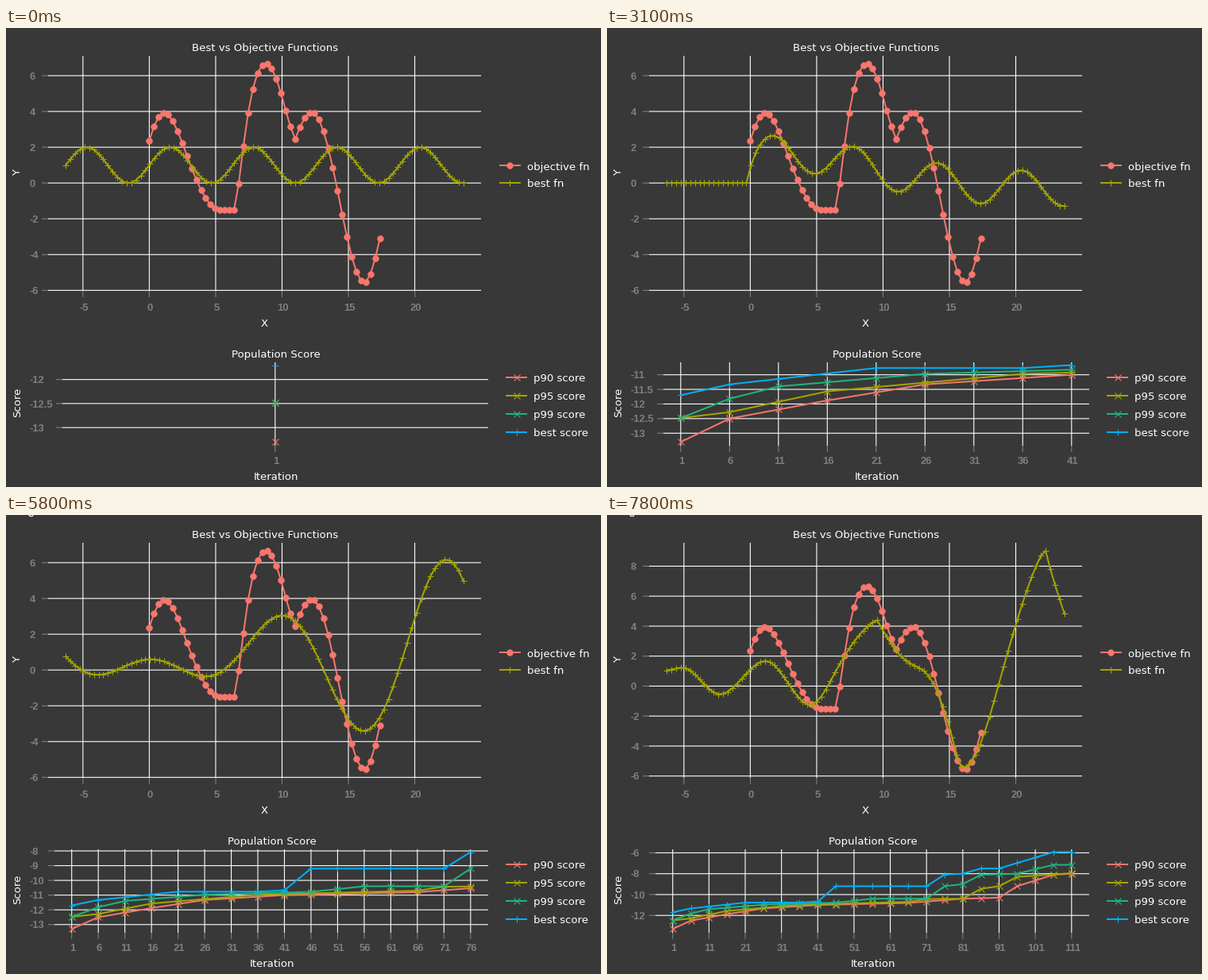
A matplotlib script for the animation above (8000 ms loop, 749 by 578 pixels).

```python
import numpy as np
import matplotlib.pyplot as plt
from matplotlib.animation import FuncAnimation

W, H, DPI = 749, 578, 100
STEP_MS, LOOP_MS = 100, 8000
PX = 72 / DPI
BG, GREY = "#383838", "#7f7f7f"
RED, OLIVE, GREEN, BLUE = "#f8766d", "#a3a500", "#1fb57e", "#00b0f6"


def spline(*knots):
    """Cubic through (x, y, slope) knots; a repeated x makes a corner."""
    kx, ky, slope = np.array(knots).T

    def curve(x):
        k = np.clip(np.searchsorted(kx, x, "right") - 1, 0, len(kx) - 2)
        h = kx[k + 1] - kx[k]
        u = (x - kx[k]) / h
        rise = ky[k + 1] - ky[k]
        return (ky[k] + rise * u * u * (3 - 2 * u)
                + h * u * (1 - u) * (slope[k] * (1 - u) - slope[k + 1] * u))
    return curve


def wave(offset):
    return lambda x: np.sin(x) + offset


def root_wave(offset):
    return lambda x: np.where(
        x < 0, 0, np.sin(x) + np.sin(np.sqrt(np.maximum(x, 0))) + offset)


def swell(gain, offset):
    return lambda x: offset - gain * x * np.sin((x - .2) / 2)


objective = spline(
    (0, 2.38, 2.5), (1.1, 3.93, 0), (2.84, 1.52, -2.05), (5.3, -1.5, 0),
    (6.4, -1.5, 0), (6.4, -1.5, 3), (7.09, 2.05, 6), (8.75, 6.67, 0),
    (9.93, 5, -2.7), (11, 2.45, -1.5), (11, 2.45, 2.1), (12.25, 3.96, 0),
    (14.18, -.42, -3.75), (16.2, -5.57, 0), (17.4, -3, 3.4))
fitted = spline(
    (-6.3, 1.05, .1), (-5.1, 1.23, 0), (-2.3, -.55, 0), (1.17, 1.68, 0),
    (4.5, -1.25, 0), (6.8, 1.57, 1.55), (9.55, 4.43, .5), (9.55, 4.43, -1.7),
    (11.4, 1.95, -.9), (13.1, 1, -.65), (15.2, -3.4, -3.2), (16, -5.45, 0),
    (18.4, -.9, 3.2), (22.2, 9.2, 1.5), (22.2, 9.2, -3.8), (23.7, 4.7, -2.9))

OBJ_X = np.arange(50) * .3546
OBJ_Y = objective(OBJ_X)
BEST_X = np.linspace(-2 * np.pi, OBJ_X[-1] + 2 * np.pi, 86)
BEST_FNS = [
    (0, wave(1)), (1100, wave(.7)), (1300, root_wave(1.85)),
    (1600, root_wave(.45)), (1900, root_wave(.6)), (3100, root_wave(.7)),
    (3400, swell(.5, 0)), (5500, swell(.5, .8)), (5800, swell(.25, .6)),
    (6100, swell(.25, 1)), (6700, swell(.25, 1.35)), (7000, swell(.5, 1.8)),
    (7300, swell(.5, 1.2)), (7800, fitted),
]

# Turning points (iteration, score) of each line
SCORES = {
    "p90 score": (RED, "x", [
        (1, -13.3), (6, -12.5), (16, -11.88), (26, -11.33), (41, -11),
        (66, -10.8), (81, -10.4), (91, -10.3), (96, -9.2), (106, -8.1),
        (111, -8)]),
    "p95 score": (OLIVE, "x", [
        (1, -12.48), (6, -12.28), (16, -11.57), (36, -10.97), (66, -10.7),
        (71, -10.43), (81, -10.4), (86, -9.45), (91, -9.2), (96, -8.3),
        (111, -7.95)]),
    "p99 score": (GREEN, "x", [
        (1, -12.48), (6, -11.82), (11, -11.4), (26, -10.97), (46, -10.78),
        (56, -10.4), (71, -10.4), (76, -9.2), (81, -9), (86, -8.1), (96, -8),
        (106, -7.15), (111, -7.15)]),
    "best score": (BLUE, "+", [
        (1, -11.7), (6, -11.33), (21, -10.77), (36, -10.77), (41, -10.67),
        (46, -9.2), (71, -9.2), (76, -8.08), (81, -8), (86, -7.5), (91, -7.5),
        (106, -5.93), (111, -5.93)]),
}
# Pace of the search: (time, updates so far)
PACE = [(1000, 0), (1100, 1), (2000, 4), (3000, 7), (3100, 8), (5000, 13),
        (5400, 14), (5500, 15), (7000, 19), (7800, 22)]

fig = plt.figure(figsize=(W / DPI, H / DPI), dpi=DPI, facecolor=BG)
ax = fig.add_axes([0, 0, 1, 1])


def follow(points, at):
    xs, ys = zip(*points)
    return np.interp(at, xs, ys)


def line(xs, ys, color, width, **kw):
    ax.plot(xs, ys, color=color, lw=width * PX, **kw)


def rule(x0, y0, x1, y1, color="white"):
    line([x0, x1], [y0, y1], color, 1.1, solid_capstyle="butt", snap=False)


def series(xs, ys, color, marker):
    size, edge = (7.6, .8) if marker == "o" else (8.4, 1.1)
    line(xs, ys, color, 2, marker=marker, ms=size * PX, mew=edge * PX,
         solid_joinstyle="round")


def text(x, y, s, ha="center", va="baseline", **kw):
    ax.text(x, y, s, ha=ha, va=va, color="white", family="DejaVu Sans",
            size=13.2 * PX, **kw)


def tick_label(x, y, value, ha="center"):
    ax.text(x, y + 4.6, f"{value:g}", ha=ha, va="baseline", color=GREY,
            family="Liberation Sans", weight="bold", size=13 * PX)


def scale(d0, d1, p0, p1):
    return lambda v: p0 + (np.asarray(v) - d0) * (p1 - p0) / (d1 - d0)


def ticks(lo, hi, step):
    return np.arange(np.ceil(lo / step), np.floor(hi / step) + 1) * step


def grid(x_ticks, y_ticks, sx, sy, box, label_y):
    x0, y0, x1, y1 = box
    for v in y_ticks:
        y = sy(v)
        rule(x0 - 8, y, x0, y, GREY)
        rule(x0, y, x1, y)
        tick_label(30, y, v, "left")
    for v in x_ticks:
        x = sx(v)
        rule(x, y1, x, y1 + 8, GREY)
        rule(x, y0, x, y1)
        tick_label(x + 1, label_y, v)


def legend(x, y, text_y, label, color, marker):
    series([x + 13.5], [y], color, marker)
    line([x, x + 27], [y, y], color, 2, solid_capstyle="butt")
    text(x + 35, text_y, label, "left")


def draw_functions(t):
    best = [fn for start, fn in BEST_FNS if start <= t][-1](BEST_X)
    lo, hi = min(best.min(), OBJ_Y.min()), max(best.max(), OBJ_Y.max())
    sy = scale(lo, hi, 320, 45.3)
    pad = (hi - lo) * 10.5 / 274.7
    y_ticks = ticks(lo - pad, hi + pad, 2)
    shift = 1 if y_ticks[-1] >= 10 else 0
    sx = scale(BEST_X[0], BEST_X[-1], 75.4 + 2 * shift, 575.7)
    grid(range(-5, 21, 5), y_ticks, sx, sy, (53 + 2 * shift, 35, 598, 331), 351)
    series(sx(OBJ_X), sy(OBJ_Y), RED, "o")
    series(sx(BEST_X), sy(best), OLIVE, "+")
    text(326.5 + shift, 29, "Best vs Objective Functions")
    text(325.5 + shift, 376, "X")
    text(15, 182, "Y", va="center", rotation=90)
    legend(620.5, 172.5, 179, "objective fn", RED, "o")
    legend(620.5, 195, 200, "best fn", OLIVE, "+")


def draw_scores(t):
    n = 1 + int(follow(PACE, t) + .1)
    iters = 1 + 5 * np.arange(n)
    lines = {label: follow(points, iters)
             for label, (_, _, points) in SCORES.items()}
    lo, hi = lines["p90 score"][0], lines["best score"][-1]
    sy = scale(lo, hi, 521.3, 424.5)
    pad = (hi - lo) * 3.5 / 96.8
    step = .5 if hi - lo < 3 else 1 if hi - lo < 5.6 else 2
    wide = step == .5
    left = 92.8 if wide else 82.7
    sx = scale(1, iters[-1], left, 584.8) if n > 1 else lambda v: v * 0 + 338.8
    grid(iters[::2] if n > 20 else iters, ticks(lo - pad, hi + pad, step),
         sx, sy, (71 if wide else 61, 421, 607, 526), 544)
    for i, (label, (color, marker, _)) in enumerate(SCORES.items()):
        series(sx(iters), sy(lines[label]), color, marker)
        y = 439.8 + 23 * i
        legend(629, y, y + 5.3, label, color, marker)
    middle = 340 if wide else 334.5
    text(middle, 415, "Population Score")
    text(middle, 569, "Iteration")
    text(15, 471, "Score", va="center", rotation=90)


def update(i):
    t = i * STEP_MS
    ax.clear()
    ax.axis("off")
    ax.set_xlim(0, W)
    ax.set_ylim(H, 0)
    ax.set_autoscale_on(False)
    draw_functions(t)
    draw_scores(t)
    if t >= 3800:
        line([29, 30, 33, 34], [0, 1.5, 1.5, 0], "white", 1.2)
    return []


anim = FuncAnimation(fig, update, frames=LOOP_MS // STEP_MS, interval=STEP_MS,
                     init_func=lambda: [], repeat=True, repeat_delay=0)
plt.show()
```
